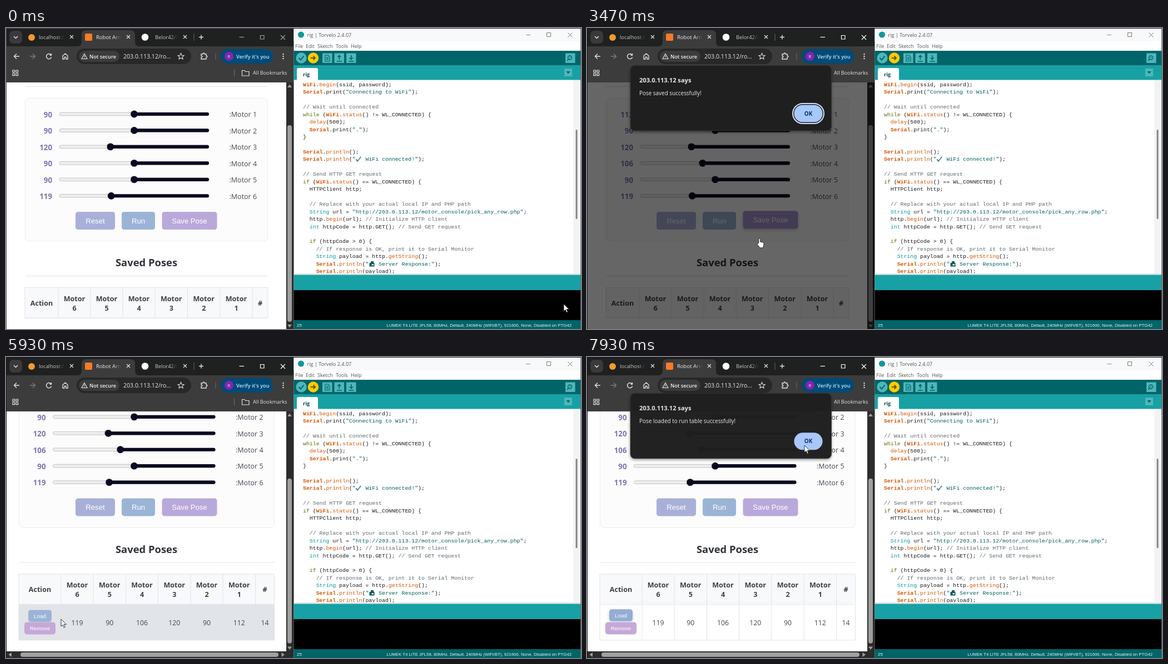
These frames come from a looping animation (1034x542 px, 8 s). An HTML page:

```html
<!DOCTYPE html>
<html lang="en">
<head>
<meta charset="utf-8">
<title>Motor control</title>
<style>
  html, body { margin: 0; width: 100%; height: 100%; overflow: hidden; background: #10151f; }
  svg { display: block; width: 1034px; height: 542px; }
  text { font-family: "Open Sans", "Noto Sans", sans-serif; white-space: pre; }
  .ui { font-family: "Liberation Sans", Arial, sans-serif; }
  .code { font-family: "Liberation Mono", "Courier New", monospace; }
</style>
</head>
<body>
<svg id="stage" viewBox="0 0 1034 542"></svg>
<script>
const LOOP = 8000;
const HOST = '203.0.113.12';

// Markup helpers
const esc = s => String(s).replace(/&/g, '&amp;').replace(/</g, '&lt;').replace(/>/g, '&gt;');
const rect = (x, y, w, h, fill, extra = '') =>
  `<rect x="${x}" y="${y}" width="${w}" height="${h}" fill="${fill}" ${extra}/>`;
const circle = (x, y, r, fill, extra = '') => `<circle cx="${x}" cy="${y}" r="${r}" fill="${fill}" ${extra}/>`;
const text = (x, y, s, size, fill, extra = '') =>
  `<text x="${x}" y="${y}" font-size="${size}" fill="${fill}" ${extra}>${esc(s)}</text>`;
const line = (d, stroke, width = 1.3, extra = '') =>
  `<path d="${d}" fill="none" stroke="${stroke}" stroke-width="${width}" ${extra}/>`;
const shape = (d, fill, extra = '') => `<path d="${d}" fill="${fill}" ${extra}/>`;
const MID = 'text-anchor="middle"', END = 'text-anchor="end"';
const BOLD = 'font-weight="700"', SEMI = 'font-weight="600"';

// Timing helpers
const clamp = v => Math.max(0, Math.min(1, v));
const ease = v => v * v * (3 - 2 * v);
const ramp = (t, from, to) => ease(clamp((t - from) / (to - from)));

const cursorPath = [
  [70, 1003, 497], [780, 236, 217], [870, 231, 241], [1070, 231, 241], [1290, 208, 241],
  [1400, 199, 183], [1800, 231, 154], [1930, 231, 154], [2330, 199, 155], [2730, 185, 348],
  [2800, 190, 349], [2930, 300, 351], [3200, 300, 351], [3470, 310, 379], [4000, 391, 155],
  [4130, 391, 155], [4730, 216, 401], [4870, 215, 406], [4930, 215, 406], [5000, 241, 406],
  [5470, 241, 406], [5930, 99, 472], [6270, 70, 468], [6470, 62, 466], [6670, 62, 466],
  [7000, 275, 262], [7470, 391, 159]
];
const dialogs = [
  { open: 3200, close: 4075, message: 'Pose saved successfully!' },
  { open: 6670, close: 7913, message: 'Pose loaded to run table successfully!' }
];
const RELOAD = 4270, CLOSE_TIME = 150;

function cursorAt(t) {
  const i = cursorPath.findIndex(p => p[0] > t);
  if (i === 0) return cursorPath[0].slice(1);
  if (i < 0) return cursorPath[cursorPath.length - 1].slice(1);
  const [t0, x0, y0] = cursorPath[i - 1], [t1, x1, y1] = cursorPath[i];
  const k = ease((t - t0) / (t1 - t0));
  return [x0 + (x1 - x0) * k, y0 + (y1 - y0) * k];
}

// Browser window
function browserFrame(active) {
  const ctl = active ? '#fff' : '#a0a0a0', pale = '#e3e3e3', dim = '#c7c7c7';
  const close = x => line(`M${x - 3} 13l6 6m0-6l-6 6`, pale, 1.2);
  return rect(0, 0, 517, 542, active ? '#10151f' : '#4b4f54') + rect(1, 1, 516, 541, '#1f2020') +
    rect(1, 33, 516, 65, '#3c3c3c') +
    shape('M128 33q8 0 8-8v-13q0-8 8-8h80q8 0 8 8v13q0 8 8 8z', '#3c3c3c') +
    rect(6, 5, 23, 23, '#3a3a3a', 'rx="7"') + line('M14 15l3.5 3.5L21 15', pale, 1.5) +
    circle(46, 17, 6, '#f29a2e') + text(59, 20, 'localhost /', 9.3, dim) +
    rect(142, 10, 13, 13, '#fb7a24', 'rx="2"') + text(162, 20, 'Robot Arm', 9.5, '#f0f0f0') +
    circle(250, 16.5, 6.3, '#fff') + text(268, 20, 'Belor42/Ra', 9.4, dim) +
    rect(92, 8, 14, 18, 'url(#fadeStrip)') + rect(194, 8, 13, 18, 'url(#fadeTab)') + rect(207, 8, 8, 18, '#3c3c3c') +
    rect(296, 8, 12, 18, 'url(#fadeStrip)') + rect(308, 8, 8, 18, '#1f2020') +
    close(118) + close(220) + close(322) +
    line('M338 10v13', '#555') + line('M347 16.5h8m-4-4v8', pale, 1.4) +
    line('M419.500 16.500h8.500', ctl, 1.2) + line('M457.500 13.500h6.500v6.500h-6.500z', ctl, 1.2) +
    line('M494 13l8 8m0-8l-8 8', ctl, 1.2) +
    line('M24 51h-9.500m4.500-4.500l-4.500 4.500 4.500 4.500', pale, 1.4) +
    line('M43 51h9.500m-4.500-4.500l4.500 4.500-4.500 4.500', '#7b7b7b', 1.4) +
    line('M81 48.500a4.600 4.600 0 1 0 .6 4M81.500 46v3h-3', pale, 1.4) +
    line('M102 56v-6l4.500-3.800 4.500 3.800v6h-3v-3.500h-3v3.500z', pale, 1.3) +
    rect(127, 37, 206, 28, '#282828', 'rx="14"') + rect(131, 41, 73, 20, '#3c3c3c', 'rx="10"') +
    line('M141 46.500l5 9h-10zM141 49.500v3m0 1v1', pale, 1.1) +
    text(150, 54.5, 'Not secure', 9.2, '#f0f0f0', SEMI) + text(211, 55, HOST + '/ro...', 10.6, '#e8e8e8') +
    line('M314.500 45.500l1.600 3.700 4 .3-3 2.600 1 3.900-3.600-2-3.500 2 1-3.900-3-2.600 4-.3z', pale, 1.1) +
    line('M351 47h3q0-2 1.500-2t1.500 2h3v3q2 0 2 1.500t-2 1.500v3h-9v-3q2-.3 2-1.500t-2-1.500z', pale, 1.3) +
    line('M377 45v12', '#5b5f66') +
    rect(386, 38, 94, 26, '#004a77', 'rx="13"') + circle(401, 51, 8, '#8226ae') +
    text(401, 53.7, 'R', 7, '#fff', MID) + text(414, 54.5, "Verify it's you", 9.2, '#c2e7ff', SEMI) +
    [47, 51, 55].map(y => circle(498.5, y, 1.2, pale)).join('') +
    [12, 18].map(x => [76, 82].map(y => line(`M${x} ${y}h3.600v3.600h-3.600z`, pale, 1.2)).join('')).join('') +
    line('M410.500 74v13', '#66686c') + line('M424.500 76.500h4.500l1.500 2h6.500v7.500h-12.500z', pale, 1.2) +
    text(444, 84, 'All Bookmarks', 9.2, '#e3e3e3');
}

// Page geometry: the table row widens the layout and adds a horizontal scrollbar
const layouts = {
  wide: { left: 34, right: 471, trackL: 96, trackR: 365, cols: [34, 94, 152, 210, 268, 326.5, 385, 443, 471] },
  narrow: { left: 23, right: 482.500, trackL: 84.500, trackR: 376.500, cols: [23, 99, 157, 215.500, 273.500, 332, 390, 448.500, 482.500] }
};
const trackY = i => 155 + i * 29.45;
const buttons = [
  { label: 'Reset', x: 125, y: 331, w: 71, h: 32, size: 13.2, fill: '#a9b0d8', hot: '#959ecf' },
  { label: 'Run', x: 208, y: 331, w: 60, h: 32, size: 13.2, fill: '#9bb4d6', hot: '#86a4cd' },
  { label: 'Save Pose', x: 280.500, y: 331, w: 99, h: 32, size: 13.1, fill: '#b9a9da', hot: '#a892d4' }
];
const rowButtons = [
  { label: 'Load', x: 40, y: 532, w: 42, h: 21.500, size: 9.8, fill: '#9bb4d6', hot: '#93add4' },
  { label: 'Remove', x: 33, y: 554, w: 56, h: 22, size: 9.8, fill: '#c5a8d8', hot: '#b896d0' }
];

function button(b, hot) {
  const lift = hot ? b.h / 20 : 0;
  return (hot ? rect(b.x - 1, b.y, b.w + 2, b.h + 2, '#000', 'rx="6" opacity=".13" filter="url(#blur)"') : '') +
    rect(b.x, b.y - lift, b.w, b.h, hot ? b.hot : b.fill, 'rx="4.500"') +
    text(b.x + b.w / 2, b.y + b.h / 2 - lift + b.size * .36, b.label, b.size, '#fff', `class="ui" ${MID}`);
}

function slider(L, i, value, hot) {
  const y = trackY(i), span = L.trackR - L.trackL;
  const x = L.trackR - 6.5 - value / 180 * (span - 13);
  return text(L.trackL - 13, y + 5.8, Math.round(value), 13.3, '#7f72b3', `${BOLD} ${END}`) +
    rect(L.trackL, y - 2.8, span, 5.6, hot ? '#e3e3e3' : '#efefef', `rx="2.800" stroke="${hot ? '#a5a5a5' : '#b6b6b6'}" stroke-width=".8"`) +
    rect(x, y - 3.1, L.trackR - x, 6.2, hot ? '#000' : '#090920', 'rx="3"') + circle(x, y, 6.4, '#090920') +
    text(L.trackR + 36.5, y + 5.3, ':Motor ' + (i + 1), 12.5, '#444a50');
}

function table(L, values, hasRow, rowHot, hot) {
  const { cols } = L, grid = '#dfe3e8', mid = i => (cols[i] + cols[i + 1]) / 2;
  const bottom = hasRow ? 586.5 : 522;
  const head = (i, s, y) => text(mid(i), y, s, 12.6, '#3d4248', `${BOLD} ${MID}`);
  let out = rect(L.left, 467.5, L.right - L.left, 54.5, '#f8f9fb');
  if (hasRow) out += rect(L.left, 522, L.right - L.left, 64.5, rowHot ? '#e1e4e8' : '#fff');
  out += cols.map(x => line(`M${x} 467.500V${bottom}`, grid, 1)).join('') +
    [467.5, 522, bottom].map(y => line(`M${L.left} ${y}H${L.right}`, grid, 1)).join('') +
    head(0, 'Action', 500) + head(7, '#', 500);
  for (let m = 6; m > 0; m--) out += head(7 - m, 'Motor', 491.5) + head(7 - m, m, 508.5);
  if (!hasRow) return out;
  const cell = (i, s) => text(mid(i), 559.5, s, 12.3, '#444a50', MID);
  return out + values.map((v, i) => cell(6 - i, Math.round(v))).join('') + cell(7, 14) +
    rowButtons.map(b => button(b, hot === b)).join('');
}

function page(s) {
  const L = s.layout, w = L.right - L.left;
  return rect(1, 98, 503, 444, '#fff') +
    `<g clip-path="url(#${s.hasRow ? 'shortPage' : 'fullPage'})"><g transform="translate(0 ${-s.scroll})">` +
    line(`M${L.left} 105.500h${w}`, '#dfe3e8', 1) +
    rect(L.left + .5, 126.5, w - 1, 257.5, '#fcfcfd', 'rx="7" stroke="#ececf0"') +
    s.values.map((v, i) => slider(L, i, v, s.hotSlider === i)).join('') +
    buttons.map(b => button(b, s.hotButton === b)).join('') +
    text(252.5, 429.3, 'Saved Poses', 18.4, '#2f3338', `${BOLD} ${MID}`) +
    line(`M${L.left} 446.500h${w}`, '#dfe3e8', 1) +
    table(L, s.values, s.hasRow, s.rowHot, s.hotButton) + '</g></g>' + scrollbars(s);
}

function scrollbars(s) {
  const end = s.hasRow ? 524 : 536.5, grey = '#9f9f9f';
  const top = s.hasRow ? 166 + s.scroll * .69 : 175;
  return rect(504, 98, 13, 444, '#2c2c2c') + shape('M506 107l4-5.500 4 5.500z', grey) +
    shape(`M506 ${end - 2.5}l4 5.500 4-5.500z`, grey) +
    rect(506, top, 8, s.hasRow ? 297 : 354, grey, 'rx="4"') +
    (s.hasRow ? rect(1, 530, 503, 12, '#2c2c2c') + shape('M10 532l-5.500 4 5.500 4z', grey) +
      shape('M495.500 532l5.500 4-5.500 4z', grey) + rect(26, 532, 464, 8, grey, 'rx="4"') : '');
}

function dialog(d, t) {
  const shown = ramp(t, d.open, d.open + 190), gone = clamp((t - d.close) / CLOSE_TIME);
  const shift = -15 * (1 - shown) - 18 * gone, closing = t >= d.close;
  return (closing ? '' : rect(1, 98, 516, 444, '#000', `opacity="${.6 * shown}"`)) +
    `<g opacity="${shown * (1 - gone * gone)}" transform="translate(0 ${shift})">` +
    rect(77, 70, 363, 118, '#000', 'rx="9" opacity=".35" filter="url(#blur)"') +
    rect(78, 67.5, 361.5, 117.5, '#1f1f1f', 'rx="8" stroke="#363636" stroke-width=".8"') +
    text(94, 98, HOST + ' says', 11.1, '#e8e8e8', BOLD) +
    text(94, 121.3, d.message, 9.93, '#ececec') +
    (closing ? '' : rect(370, 136, 56, 36, 'none', 'rx="18" stroke="#d3e3fd" stroke-width="2"')) +
    rect(372.4, 138.5, 51.2, 31, '#a8c7fa', 'rx="15.500"') +
    text(398, 157.6, 'OK', 10, '#062e6f', `${BOLD} ${MID}`) + '</g>';
}

// Code editor window
const source = `WiFi.begin(ssid, password);
Serial.print("Connecting to WiFi");

// Wait until connected
while (WiFi.status() != WL_CONNECTED) {
  delay(500);
  Serial.print(".");
}

Serial.println();
Serial.println("   WiFi connected!");

// Send HTTP GET request
if (WiFi.status() == WL_CONNECTED) {
  HTTPClient http;

  // Replace with your actual local IP and PHP path
  String url = "http://${HOST}/motor_console/pick_any_row.php";
  http.begin(url); // Initialize HTTP client
  int httpCode = http.GET(); // Send GET request

  if (httpCode > 0) {
    // If response is OK, print it to Serial Monitor
    String payload = http.getString();
    Serial.println("   Server Response:");
    Serial.println(payload);`.split('\n');
const syntax = /(\/\/.*)|("[^"]*")|\b(WiFi|Serial)\b|\b(begin|println?|status|delay|getString)\b|\b(while|if)\b|\b(String|int)\b/g;
const tokenStyles = ['fill="#5c686d"', 'fill="#005c5f"', `fill="#d35400" ${BOLD}`, 'fill="#d35400"', 'fill="#5e6d03"', 'fill="#00979c"'];

function codeLine(s, i) {
  const body = esc(s).replace(syntax, (m, ...g) =>
    `<tspan ${tokenStyles[g.slice(0, 6).findIndex(Boolean)]}>${m}</tspan>`);
  return `<text class="code" x="534" y="${104.8 + i * 13.46}" font-size="9.87" fill="#1a1a1a">${body}</text>`;
}

function editor() {
  const teal = '#17a1a5', deep = '#006468', light = '#4db7bb';
  const menus = { File: 520, Edit: 539, Sketch: 560, Tools: 593, Help: 620 };
  const tool = x => rect(x, 45.5, 17.5, 17.5, light);
  return rect(517.5, 1, 516.5, 541, '#fff') + rect(517.5, 1, 516.5, 23, '#f8f9fb') +
    circle(530.5, 12, 5.6, '#12979d') + text(541.5, 16, 'rig | Torvelo 2.4.07', 9.1, '#555') +
    line('M935 12.500h8', '#8b8b8b', 1) + line('M972.500 8.500h7v7h-7z', '#777', 1) + line('M1010.500 8.500l8 8m0-8l-8 8', '#777', 1) +
    Object.entries(menus).map(([s, x]) => text(x, 36, s, 9, '#555')).join('') +
    rect(517.5, 41, 516.5, 26, deep) + rect(517.5, 67, 516.5, 26.5, teal) +
    circle(531, 54, 9.7, light) + line('M526.500 54l3.500 3.500 5.500-7', deep, 2) +
    circle(552.5, 54, 9.7, '#ffcc00') + line('M547.500 54h8.500m-3.500-3.500l3.500 3.500-3.500 3.500', '#6b5600', 2) +
    tool(569) + tool(590.5) + tool(612) + tool(1006) +
    line('M574 49h5l3 3v8h-8zM576 53h4m-4 2h4m-4 2h4', deep, 1.1) +
    line('M599.300 57v-7.500m-3 3l3-3 3 3M595 60h9M620.800 49v7.500m-3-3l3 3 3-3M616.500 60h9', deep, 1.6) +
    circle(1014, 53.5, 3.5, 'none', `stroke="${deep}" stroke-width="1.400"`) + circle(1014, 53.5, 1, deep) + line('M1011.500 56l-2.500 3', deep, 1.5) +
    shape('M523 94v-19q0-3 3-3h32q3 0 3 3v19z', '#fff') + text(534, 87, 'rig', 9.2, '#004b50', BOLD) +
    rect(1004, 73, 14, 14, light) + shape('M1007.500 78h7l-3.500 4.500z', deep) +
    `<g clip-path="url(#editorClip)">` + source.map(codeLine).join('') +
    line('M629.500 236.500l2.500 3 6-7.500', '#005c5f', 2) + line('M630 236.800l2.100 2 5.200-6.300', '#fff', .8) +
    rect(653.5, 423, 9, 6.500, '#005c5f') + rect(656, 420, 5, 4, '#005c5f') + rect(657.5, 425, 3.5, 2.5, '#fff') + '</g>' +
    rect(1020, 94, 13, 348, '#f3f3f3') + rect(1024.5, 183, 3, 161, '#858585', 'rx="1.500"') +
    rect(517.5, 442, 516.5, 2.5, '#dfe6e6') + rect(517.5, 444.5, 516.5, 27.5, teal) + rect(517.5, 472, 516.5, 54, '#000') +
    rect(517.5, 526, 516.5, 16, deep) + line('M1033.500 1v541', '#5d7076', 1) + text(523, 538, '25', 8, '#e8f4f4', 'class="ui"') +
    text(1017, 538, 'LUMEK T4 LITE JFL58, 80MHz, Default, 240MHz (WiFi/BT), 921600, None, Disabled on PTG42', 7.8, '#e8f4f4', `class="ui" ${END}`);
}

const clip = (id, x, y, w, h) => `<clipPath id="${id}">${rect(x, y, w, h, '#000')}</clipPath>`;
const fade = (id, c) => `<linearGradient id="${id}"><stop stop-color="${c}" stop-opacity="0"/><stop offset="1" stop-color="${c}"/></linearGradient>`;
const stage = document.getElementById('stage');
stage.innerHTML = '<defs>' + clip('fullPage', 1, 98, 503, 444) + clip('shortPage', 1, 98, 503, 432) +
  clip('editorClip', 518, 94, 502, 347.5) + fade('fadeStrip', '#1f2020') + fade('fadeTab', '#3c3c3c') +
  '<filter id="blur" x="-20%" y="-30%" width="140%" height="160%"><feGaussianBlur stdDeviation="2.500"/></filter></defs>' +
  `<g id="frame"></g><g id="page"></g><g id="dialog"></g>${editor()}<g id="cursor"></g>`;
const layer = id => document.getElementById(id);
const layers = { frame: layer('frame'), page: layer('page'), dialog: layer('dialog'), cursor: layer('cursor') };
const drawn = {};
function paint(name, markup) {
  if (drawn[name] !== markup) layers[name].innerHTML = drawn[name] = markup;
}

const arrow = shape('M0 0V13l3-2.700 2.200 4.900 2.100-.9-2.200-4.700h4.300z', '#fff', 'stroke="#222" stroke-width=".9"');
const hand = shape('M-1.200 8.500V1.500q0-1.500 1.400-1.500t1.400 1.500V6l5 1.200q1.800.5 1.500 2.500l-.8 4-1 3.100H1L-3.500 11q-1.200-2 .6-2.300z',
  '#fff', 'stroke="#222" stroke-width=".9"');
const inside = ([x, y], b) => x >= b.x && x <= b.x + b.w && y >= b.y && y <= b.y + b.h;

function render(t) {
  const cursor = cursorAt(t), hasRow = t >= RELOAD;
  const layout = hasRow ? layouts.narrow : layouts.wide;
  const scroll = 76.6 * ramp(t, 5180, 5340);
  const modal = dialogs.find(d => t >= d.open && t < d.close + CLOSE_TIME);

  // Hover stays frozen on the page while a dialog covers it
  const [x, y] = modal ? cursorAt(modal.open) : cursor;
  const point = [x, y + scroll];
  const hotSlider = [0, 1, 2, 3, 4, 5].findIndex(i =>
    x > layout.trackL && x < layout.trackR && Math.abs(point[1] - trackY(i)) < 7);
  const hotButton = buttons.concat(hasRow ? rowButtons : []).find(b => inside(point, b));
  const rowHot = hasRow && point[1] > 522 && point[1] < 586 && !(modal && t >= modal.close);
  const values = [90 + 22 * ramp(t, 1930, 2330), 90, 120, 90 + 16 * ramp(t, 1070, 1290), 90, 119];

  paint('frame', browserFrame(t >= 1070));
  paint('page', page({ layout, hasRow, scroll, hotSlider, hotButton, rowHot, values }));
  paint('dialog', modal ? dialog(modal, t) : '');
  const pointing = (hotSlider >= 0 || hotButton) && !(modal && cursor[1] < 185);
  paint('cursor', pointing ? hand : arrow);
  layers.cursor.setAttribute('transform', `translate(${cursor[0]} ${cursor[1]})`);
}

const start = performance.now();
function tick() {
  render((performance.now() - start) % LOOP);
  requestAnimationFrame(tick);
}
tick();
</script>
</body>
</html>
```
